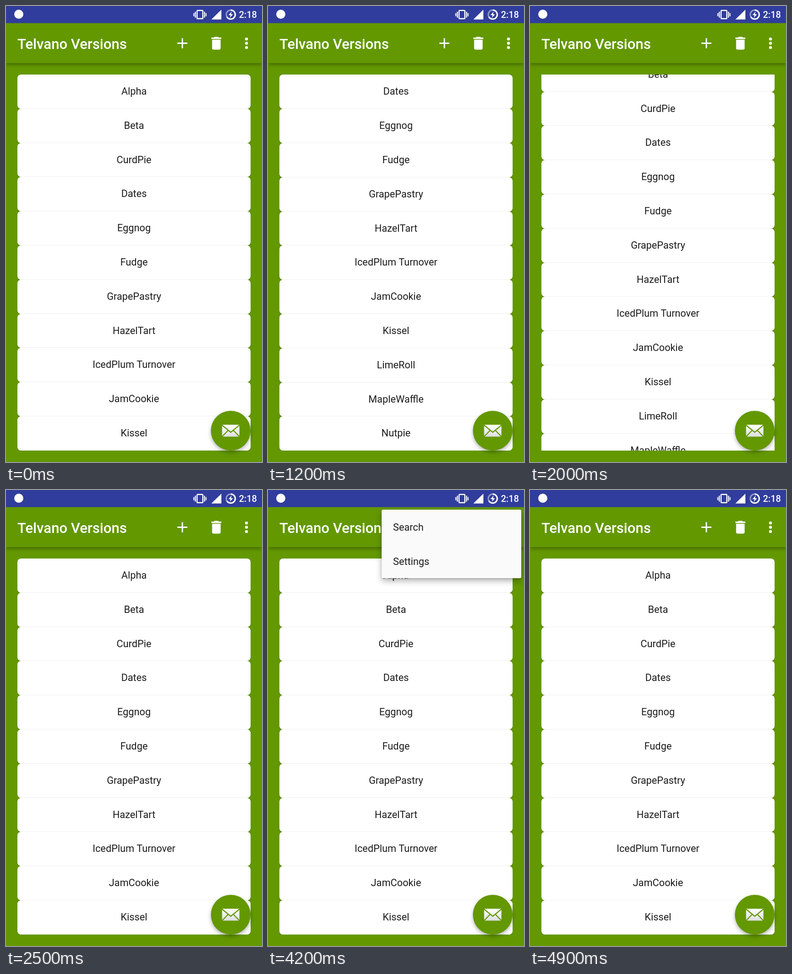
Animation, 561 px wide and 998 px high, one loop 5 s. Source, as an HTML page:

```html
<!DOCTYPE html>
<html lang="en">
<head>
<meta charset="utf-8">
<title>Versions list</title>
<style>
  html, body { margin: 0; width: 100%; height: 100%; overflow: hidden; background: #639800; }
  body { position: relative; font: 21.8px Roboto, sans-serif; color: #1c1c1c; }
  body > * { position: absolute; }
  #bar { left: 0; top: 0; width: 561px; height: 125px; background: #639800;
         box-shadow: 0 3px 8px rgba(0, 0, 0, .35); }
  #list { left: 25px; top: 150px; width: 511px; height: 823px; overflow: hidden; }
  .card { position: absolute; width: 511px; height: 74.8px; line-height: 74.8px; text-align: center;
          background: #fff; border-radius: 8px;
          box-shadow: inset 0 -1px #f3f3f3, 0 1px 2px rgba(0, 0, 0, .3); }
  #fab { left: 449px; top: 886px; width: 87px; height: 87px; border-radius: 50%;
         background: #639800; box-shadow: 0 4px 8px rgba(0, 0, 0, .3); }
  #icons { left: 0; top: 0; }
  #menu { overflow: hidden; background: #fafafa; border-radius: 3px;
          box-shadow: 0 6px 14px rgba(0, 0, 0, .3), 0 1px 3px rgba(0, 0, 0, .2); }
  #items { position: absolute; width: 306px; height: 150px; line-height: 75px; }
  #items div { padding: 1px 0 0 25px; height: 74px; }
</style>
</head>
<body>
<div id="bar"></div>
<div id="list"><div id="rows"></div></div>
<div id="fab"></div>

<svg id="icons" width="561" height="998" fill="#fff">
  <defs>
    <linearGradient id="paper" x2="0" y2="1">
      <stop stop-color="#fff"/><stop offset="1" stop-color="#dedee2"/>
    </linearGradient>
  </defs>
  <rect width="561" height="37.5" fill="#303d9c"/>
  <circle cx="28" cy="18" r="10"/>
  <g fill="none" stroke="#fff" stroke-width="2.4">
    <rect x="418.7" y="9.7" width="12.6" height="18" rx="1"/>
    <path d="M415 12.5v13M435 12.5v13M411.7 15.5v7M438.3 15.5v7" stroke-width="2.2"/>
  </g>
  <path d="M472 8v21.5h-22z"/>
  <g fill="none" stroke-width="3">
    <circle cx="492.5" cy="18.8" r="9.8" stroke="#9298cb"/>
    <path d="M492.5 9a9.8 9.8 0 1 1-8.5 14.7" stroke="#fff"/>
  </g>
  <path d="M494.5 12l-7 8h4.5l-1.500 6 7-8h-4.500z"/>
  <text x="510.500" y="26" font-size="20" font-weight="500">2:18</text>
  <text x="25" y="94" font-size="31.2" font-weight="500">Telvano Versions</text>

  <path d="M386.500 70.500v22M375.500 81.500h22" stroke="#fff" stroke-width="3.1"/>
  <path transform="translate(442.300 62.800) scale(1.558)"
        d="M6 19c0 1.100.9 2 2 2h8c1.100 0 2-.9 2-2V7H6zM19 4h-3.500l-1-1h-5l-1 1H5v2h14z"/>
  <circle id="ripple" cx="527" cy="82" r="23" opacity=".14"/>
  <circle cx="527" cy="72.200" r="3.200"/>
  <circle cx="527" cy="81.500" r="3.200"/>
  <circle cx="527" cy="90.900" r="3.200"/>

  <rect x="473.500" y="916.500" width="38" height="26" rx="1" fill="url(#paper)"/>
  <path d="M473 917l19.500 16 19.500-16M473 943l13.500-14M512 943l-13.500-14"
        fill="none" stroke="#639800" stroke-width="2.300"/>
</svg>

<div id="menu"><div id="items"><div>Search</div><div>Settings</div></div></div>

<script>
const $ = id => document.getElementById(id);
const LOOP = 5000, STEP = 100, ROW = 74.8, MAX_SCROLL = 3 * ROW;
const names = ['Alpha', 'Beta', 'CurdPie', 'Dates', 'Eggnog', 'Fudge', 'GrapePastry', 'HazelTart',
  'IcedPlum Turnover', 'JamCookie', 'Kissel', 'LimeRoll', 'MapleWaffle', 'Nutpie'];

names.forEach((name, i) => {
  const card = document.createElement('div');
  card.className = 'card';
  card.style.top = i * ROW + 'px';
  card.textContent = name;
  $('rows').append(card);
});

const progress = (t, from, to) => Math.min(1, Math.max(0, (t - from) / (to - from)));
const mix = (a, b, k) => a + (b - a) * k;
const easeInOut = u => u ** 1.7 / (u ** 1.7 + (1 - u) ** 1.7);

function scrollAt(t) {
  const down = progress(t, 1000, 1200) ** 1.96;
  const back = easeInOut(progress(t, 1700, 2300));
  return Math.round(MAX_SCROLL * (down - back));
}

// The menu grows out of the top right corner; its content stays centred in the opening.
function drawMenu(t) {
  const u = progress(t, 3600, 4000);
  const open = 1 - (1 - u) ** 3;
  const w = Math.round(mix(20, 306, open)), h = Math.round(mix(0, 150, open));
  const cx = mix(552.5, 402, open), cy = mix(42, 118, open);
  Object.assign($('menu').style, {
    left: Math.round(cx - w / 2) + 'px',
    top: Math.round(cy - h / 2) + 'px',
    width: w + 'px',
    height: h + 'px',
    opacity: Math.min(1, u * 2) * (1 - progress(t, 4500, 4800))
  });
  $('items').style.left = Math.round((w - 306) / 2) + 'px';
  $('items').style.top = Math.round((h - 150) / 2) + 'px';
  $('ripple').style.display = t > 3600 && t < 4200 ? '' : 'none';
}

function frame() {
  const t = Math.floor(performance.now() % LOOP / STEP) * STEP;
  $('rows').style.transform = `translateY(${-scrollAt(t)}px)`;
  drawMenu(t);
  requestAnimationFrame(frame);
}
frame();
</script>
</body>
</html>
```
